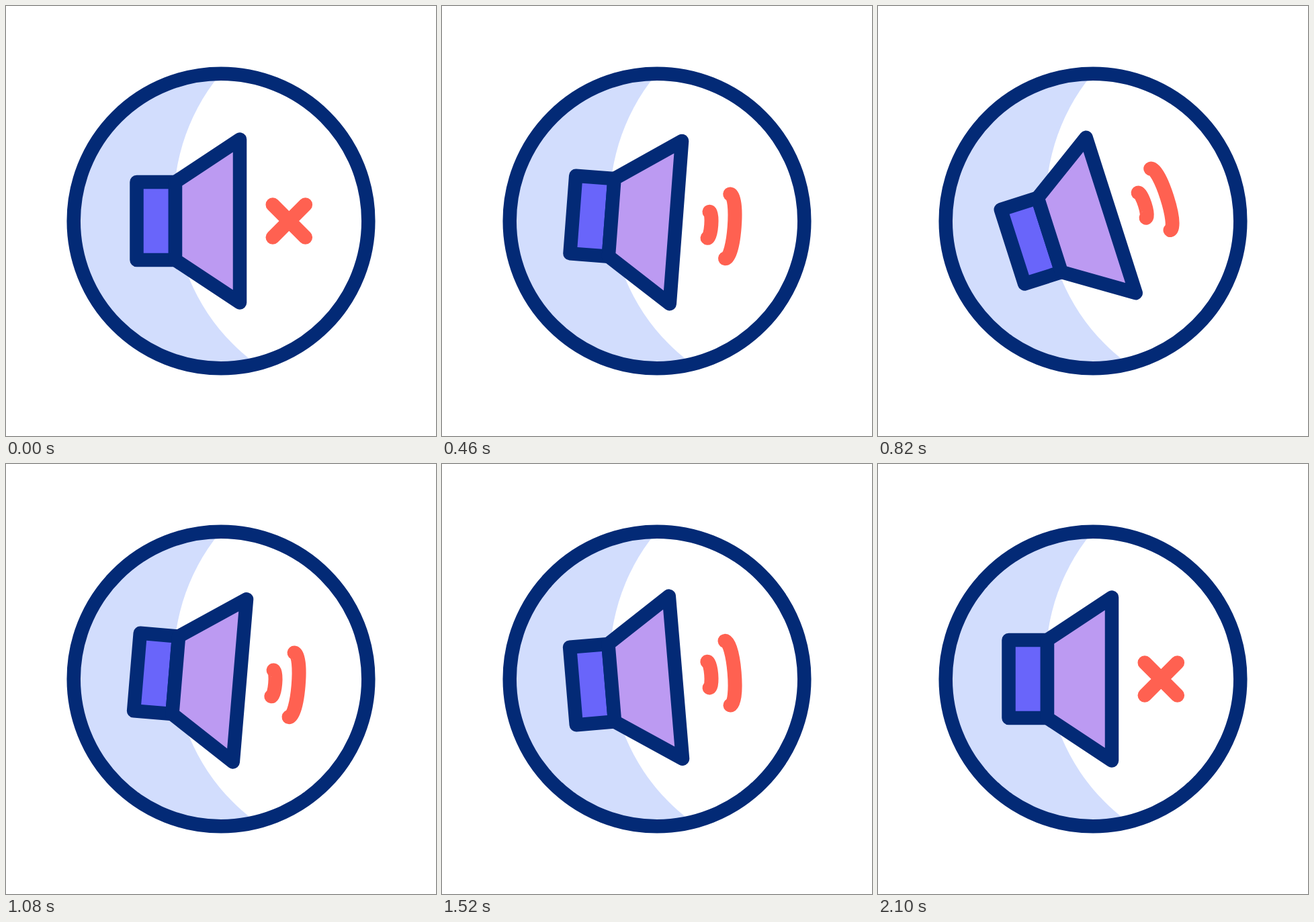
Recreate the animation shown at these times as an HTML page. Size 640 by 640 pixels, loop 2.42 s.

```html
<!DOCTYPE html>
<html lang="en">
<head>
<meta charset="utf-8">
<title>Speaker</title>
<style>
html, body { margin: 0; height: 100%; overflow: hidden; background: #fff; }
svg { display: block; width: 100%; height: 100%; }
.line { stroke: #032a76; stroke-width: 20.5; stroke-linejoin: round; }
.red { fill: none; stroke: #ff6151; stroke-width: 21; stroke-linecap: round; }
</style>
</head>
<body>
<svg viewBox="0 0 640 640">
  <clipPath id="disc"><circle cx="320" cy="320" r="219"/></clipPath>
  <g clip-path="url(#disc)">
    <rect width="640" height="640" fill="#d2ddfd"/>
    <circle cx="548.3" cy="292" r="298.2" fill="#fff"/>
  </g>
  <circle class="line" cx="320" cy="320" r="219.3" fill="none"/>
  <g id="speaker">
    <path class="line" fill="#6965fa" d="M194.5 262H252V378H194.5Z"/>
    <path class="line" fill="#bc9af2" d="M252 262L348 198.5V441.5L252 378Z"/>
    <path class="red" id="cross" d="M397 295.7l48.6 48.6m0-48.6l-48.6 48.6"/>
    <path class="red" id="inner" d="M396.7 300.5C402.4 300.5 402.4 339.5 396.7 339.5"/>
    <path class="red" id="outer" d="M425.4 272C439 272 439 368 425.4 368"/>
  </g>
</svg>
<script>
const STEP = 20, LOOP = 2420, REST = 5, LAST = 100;

// [step, value] keys
const swing = [0, 20, -20, 20, -20, 20, -20, 0].map((angle, i) => [15 + 10 * i, angle]);
const crossSize = [[0, 1], [8, 0], [92, 0], [100, 1]];
const waveSize = [[7, 0], [15, 1], [85, 1], [93, 0]];
const marks = [["cross", 421.3, crossSize], ["inner", 399, waveSize], ["outer", 430, waveSize]];
const el = id => document.getElementById(id);

// Cubic bezier (pull, 0, 1 - pull, 1)
function ease(t, pull) {
  let lo = 0, hi = 1;
  for (let n = 0; n < 24; n++) {
    const s = (lo + hi) / 2, r = 1 - s;
    const x = 3 * s * r * r * pull + 3 * s * s * r * (1 - pull) + s ** 3;
    if (x < t) lo = s; else hi = s;
  }
  return lo * lo * (3 - 2 * lo);
}

// Moves from or to rest are softer than those between extremes
function valueAt(keys, k) {
  const i = keys.findIndex(key => key[0] > k);
  if (i < 0) return keys[keys.length - 1][1];
  if (i === 0) return keys[0][1];
  const [k0, v0] = keys[i - 1], [k1, v1] = keys[i];
  const pull = v0 && v1 ? 1 / 6 : 1 / 3;
  return v0 + (v1 - v0) * ease((k - k0) / (k1 - k0), pull);
}

function draw(time) {
  const k = Math.min(LAST, Math.max(0, Math.floor(time % LOOP / STEP) - REST));
  el("speaker").setAttribute("transform", `rotate(${valueAt(swing, k)} 320 320)`);
  for (const [id, x, size] of marks) {
    const s = valueAt(size, k);
    el(id).setAttribute("transform", `translate(${x} 320) scale(${s}) translate(${-x} -320)`);
    el(id).setAttribute("visibility", s > 0 ? "visible" : "hidden");
  }
}

const start = performance.now();
function tick() {
  draw(performance.now() - start);
  requestAnimationFrame(tick);
}
tick();
</script>
</body>
</html>
```
